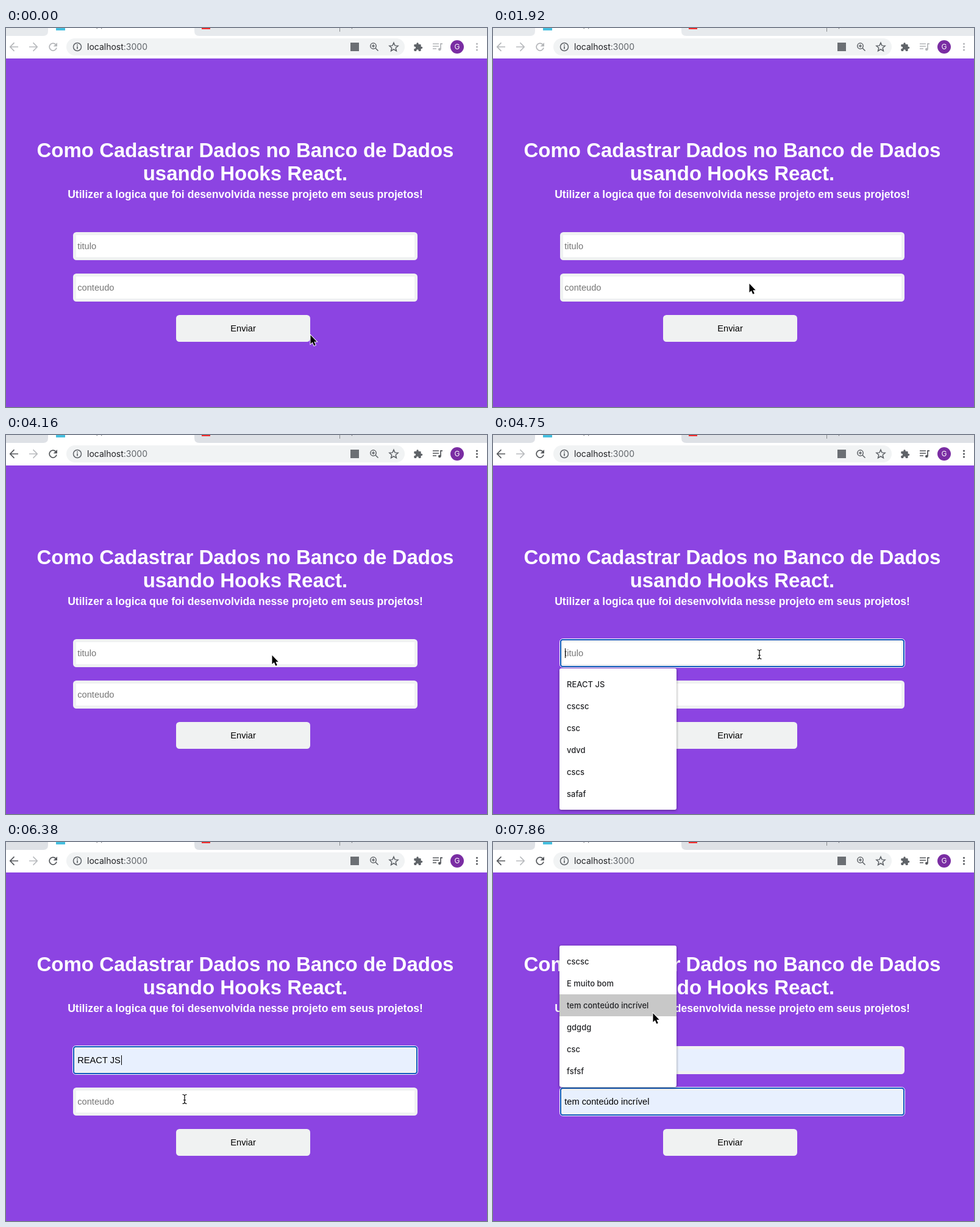
Write an HTML page that moves like this. It is 789 by 622 pixels and loops after 8000 ms.

```html
<!DOCTYPE html>
<html lang="pt">
<head>
<meta charset="utf-8">
<style>
  html, body { margin: 0; width: 100%; height: 100%; overflow: hidden; background: #8c44e2; }
  svg { display: block; width: 789px; height: 622px; font: 14.667px "Liberation Sans", Arial, sans-serif; }
  .ui { font-family: Inter, Roboto, sans-serif; }
  .heading { font-weight: bold; fill: #fff; text-anchor: middle; }
  .menu { font: 500 13px Inter, Roboto, sans-serif; fill: #222326; filter: drop-shadow(0 1px 2px #0006); }
  .line { fill: none; stroke: #5f6368; stroke-width: 1.7; }
  .live.line { stroke: #b4b6b9; }
  .live.solid { fill: #b4b6b9; }
  .active .live.line { stroke: #54575b; }
  .active .live.solid { fill: #54575b; }
  .strip { fill: #e7eaed; }
  .active .strip { fill: #dee1e6; }
</style>
</head>
<body>
<svg viewBox="0 0 789 622">
  <g id="browser" class="ui">
    <rect width="789" height="50" fill="#fff"/>
    <path class="strip" d="M0 0H69V5Q69 13 61 13H0zM309 0V5Q309 13 317 13H789V0z"/>
    <rect x="82" y="-11" width="15" height="15" fill="#45bfdf"/>
    <rect x="321" y="-12" width="14" height="14" fill="#f22b2b"/>
    <g font-size="12" fill="#5f6368"><text x="104" y="-1">React App</text><text x="566" y="-1">p</text></g>
    <path d="M547.5 0V6" stroke="#85888c"/>

    <path class="live line" d="M20 31H8M13.5 24.2 6.8 31l6.7 6.8"/>
    <path class="line" style="stroke:#b9bbbe" d="M38 31H50M44.500 24.200 51.200 31l-6.700 6.800"/>
    <path class="live line" d="M81.600 27A6 6 0 1 0 83 32.500"/>
    <path class="live solid" d="M84 24v6.300h-6.300z"/>

    <rect x="99" y="17" width="555" height="28" rx="14" fill="#f1f3f4"/>
    <circle class="line" cx="117" cy="31" r="6.500" style="stroke-width:1.500"/>
    <path class="line" d="M117 30V34.500M117 27V28.700"/>
    <text x="133" y="36" font-size="14" fill="#202124">localhost<tspan fill="#5f6368">:3000</tspan></text>

    <rect x="565" y="24" width="14" height="14" fill="#6b6f74"/>
    <g class="line" style="stroke-width:1.500">
      <circle cx="602.500" cy="29.500" r="4.700"/>
      <path d="M606 33l4.500 4.500M600 29.500h5M602.500 27v5"/>
      <path d="M636 24.200l2 4.700 5.100.4-3.900 3.400 1.200 5-4.400-2.700-4.400 2.700 1.200-5-3.900-3.400 5.100-.4z"/>
    </g>
    <path fill="#5f6368" transform="translate(668 23.300) scale(.667)" d="M20.500 11H19V7a2 2 0 0 0-2-2h-4V3.500a2.500 2.500 0 0 0-5 0V5H4a2 2 0 0 0-2 2v3.800h1.500a2.700 2.700 0 0 1 0 5.400H2V20a2 2 0 0 0 2 2h3.800v-1.500a2.700 2.700 0 0 1 5.400 0V22H17a2 2 0 0 0 2-2v-4h1.500a2.500 2.500 0 0 0 0-5z"/>
    <path class="live line" d="M700 26h10M700 30h10M700 34h6M713 35V25.800H716"/>
    <circle class="live solid" cx="711.300" cy="35" r="2.300"/>
    <circle cx="740" cy="31" r="11" fill="#7a2da3"/>
    <text x="740" y="35.300" font-size="12" fill="#fff" text-anchor="middle">G</text>
    <g class="live solid"><circle cx="772.500" cy="26" r="1.600"/><circle cx="772.500" cy="31" r="1.600"/><circle cx="772.500" cy="36" r="1.600"/></g>
  </g>

  <g class="heading">
    <text x="392.500" y="212" font-size="33">Como Cadastrar Dados no Banco de Dados</text>
    <text x="392.500" y="250" font-size="33">usando Hooks React.</text>
    <text x="392.500" y="279" font-size="17.600">Utilizer a logica que foi desenvolvida nesse projeto em seus projetos!</text>
  </g>
  <rect x="279" y="471" width="220" height="44" rx="5.500" fill="#f0f2f2"/>
  <text x="389" y="498" text-anchor="middle">Enviar</text>
  <g id="form"></g>
  <g id="pointer"></g>
</svg>
<script>
const LOOP = 8000, STEP = 148.33, LAST = 53;
const form = document.getElementById('form');
const pointer = document.getElementById('pointer');
const browser = document.getElementById('browser');

// Pointer path: [step, x, y]
const path = [
  [0, 499.5, 504], [7, 417, 430], [9, 417, 430], [13, 420.5, 419.5], [17, 428, 408.5],
  [21, 436, 357], [23, 436, 357], [25, 436.5, 361.5], [29, 436.5, 361.5], [30, 437, 360],
  [32, 437, 360], [35, 340, 385], [36, 298, 409], [38, 292, 418], [39, 292, 418],
  [43, 293, 422], [44, 292, 421], [46, 275, 372], [47, 265.5, 345.5], [52, 262.5, 283], [53, 262.5, 281]
];
const fields = [
  { y: 335, hint: 'titulo', focus: [30, 43], open: [31, 39], menuY: 383, chosenAt: 40,
    options: ['REACT JS', 'cscsc', 'csc', 'vdvd', 'cscs', 'safaf'] },
  { y: 403, hint: 'conteudo', focus: [44, LAST], open: [45, LAST], menuY: 170, chosenAt: Infinity,
    options: ['cscsc', 'E muito bom', 'tem conteúdo incrível', 'gdgdg', 'csc', 'fsfsf'] }
];
const ARROW = '<path d="M0 0v14.500l3.300-3 2.500 5.800 2.500-1-2.500-5.600h4.400z" stroke="#fff" stroke-width="1.800" paint-order="stroke"/>';
const beamPath = 'M-3.500-7.500Q0-7.500 0-5V5Q0 7.500-3.500 7.500M3.500-7.500Q0-7.500 0-5M0 5Q0 7.500 3.500 7.500M-2 1.500h4';
const BEAM = ['#fff" stroke-width="2.800', '#000" stroke-width="1.200']
  .map(s => `<path d="${beamPath}" fill="none" stroke="${s}"/>`).join('');

const within = (n, [a, b]) => n >= a && n <= b;
const rect = (x, y, w, h, attrs) => `<rect x="${x}" y="${y}" width="${w}" height="${h}" ${attrs}/>`;

function pointerAt(n) {
  const i = Math.max(1, path.findIndex(p => p[0] >= n));
  const [a, x0, y0] = path[i - 1], [b, x1, y1] = path[i];
  const k = (n - a) / (b - a);
  return [x0 + (x1 - x0) * k, y0 + (y1 - y0) * k];
}

// The highlighted row follows the pointer one step late.
function hoveredRow(field, n) {
  const [x, y] = pointerAt(Math.max(0, n - 1));
  const row = Math.floor((y - field.menuY - 8) / 36);
  return within(n, field.open) && x > 109 && x < 301 && row >= 0 && row < 6 ? row : -1;
}

function drawField(field, n) {
  const { y, hint, focus, chosenAt, options } = field;
  const chosen = n >= chosenAt;
  const value = chosen ? options[0] : options[hoveredRow(field, n)];
  const focused = within(n, focus);
  let out = rect(110, y, 565, 46, 'rx="5.500" fill="#f0f2f2"')
    + rect(115, y + 5, 555, 36, `fill="${value ? '#e8f0fe' : '#fff'}"`)
    + `<text x="117.200" y="${y + 28}" fill="${value ? '#000' : '#757575'}">${value || hint}</text>`;
  if (focused) {
    out += rect(109.5, y - .5, 566, 47, 'rx="5" fill="none" stroke="#fff"')
      + rect(111, y + 1, 563, 44, 'rx="3.500" fill="none" stroke="#1059bd" stroke-width="2"');
    const since = n - (chosen ? chosenAt : focus[0]);
    if (Math.floor(since / 5) % 2 === 0) out += rect(chosen ? 189 : 118, y + 15, 1, 16, '');
  }
  return out;
}

function drawMenu(field, n) {
  if (!within(n, field.open)) return '';
  const hovered = hoveredRow(field, n);
  const rows = field.options.map((label, i) => {
    const top = field.menuY + 8 + i * 36;
    return (i === hovered ? rect(109, top, 192, 36, 'fill="#c8c8c8"') : '')
      + `<text x="121" y="${top + 23}">${label}</text>`;
  });
  return `<g class="menu">${rect(109, field.menuY, 192, 232, 'rx="3" fill="#fff"')}${rows.join('')}</g>`;
}

function render(n) {
  browser.classList.toggle('active', n >= 28);
  form.innerHTML = fields.map(f => drawField(f, n)).join('') + fields.map(f => drawMenu(f, n)).join('');
  const [x, y] = pointerAt(n);
  const overMenu = x < 301 && fields.some(f => within(n, f.open) && y > f.menuY && y < f.menuY + 232);
  const overField = fields.some(f => y > f.y && y < f.y + 46);
  pointer.innerHTML = n >= 30 && overField && !overMenu ? BEAM : ARROW;
  pointer.setAttribute('transform', `translate(${x} ${y})`);
}

let shown = -1;
function tick() {
  const n = Math.min(LAST, Math.floor((performance.now() % LOOP + 12) / STEP));
  if (n !== shown) render(shown = n);
  requestAnimationFrame(tick);
}
tick();
</script>
</body>
</html>
```
